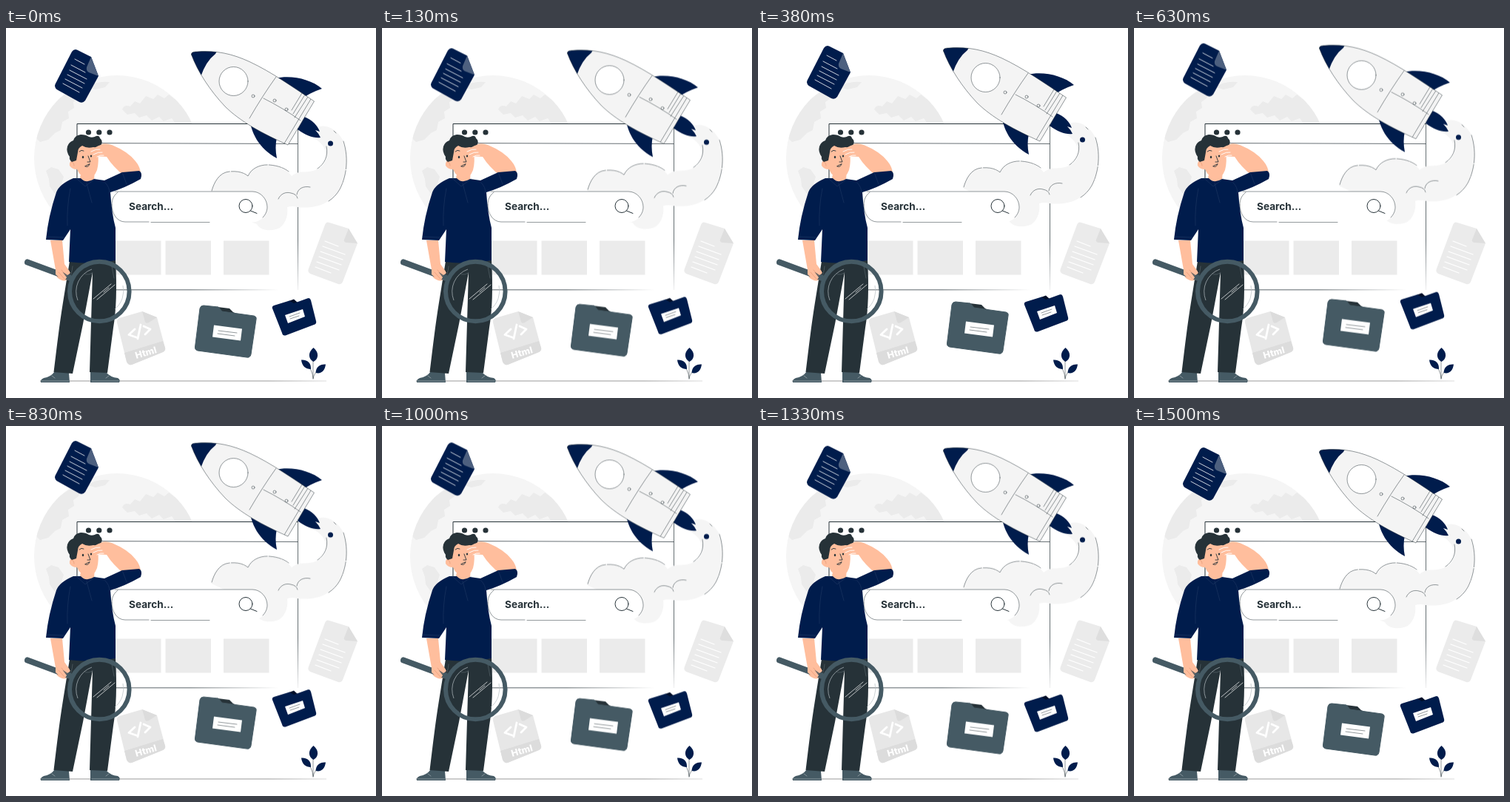
These frames come from a looping animation (500 by 500 pixels, 1540 ms). An HTML page:

```html
<!DOCTYPE html>
<html lang="en">
<head>
<meta charset="utf-8">
<title>Search</title>
<style>
  html, body { margin: 0; width: 100%; height: 100%; overflow: hidden; background: #fff; }
  svg { display: block; width: 100%; height: 100%; }
  .float { animation: float 1540ms steps(18, end) -5ms infinite; }
  /* 18 steps up, 18 steps down, one held step */
  @keyframes float {
    0% { transform: translateY(0); }
    48.6486% { transform: translateY(-10px); }
    97.2973%, 100% { transform: translateY(0); }
  }
  .navy { fill: #001c4c; }
  .dark { fill: #263238; }
  .slate { fill: #455a64; }
  .skin { fill: #ffbe9d; }
  .pale { fill: #ebebeb; }
  .white { fill: #fff; }
  .line { fill: none; stroke: #263238; stroke-width: .5; stroke-linecap: round; stroke-linejoin: round; }
  .rule { fill: none; stroke: #fff; stroke-width: .8; stroke-linecap: round; }
</style>
</head>
<body>
<svg viewBox="0 0 500 500">
  <defs>
    <linearGradient id="fadeX">
      <stop offset="0" stop-color="#263238"/><stop offset=".5" stop-color="#263238"/><stop offset="1" stop-color="#263238" stop-opacity="0"/>
    </linearGradient>
    <linearGradient id="fadeY" x2="0" y2="1">
      <stop offset="0" stop-color="#263238"/><stop offset=".7" stop-color="#263238"/><stop offset="1" stop-color="#263238" stop-opacity=".1"/>
    </linearGradient>
    <linearGradient id="ground" gradientUnits="userSpaceOnUse" x1="46" y1="0" x2="433" y2="0">
      <stop offset="0" stop-color="#999"/><stop offset=".8" stop-color="#999"/><stop offset="1" stop-color="#ddd"/>
    </linearGradient>
    <clipPath id="globe"><circle cx="150" cy="176" r="112"/></clipPath>
    <path id="hull" d="M250.500 36C250 33 253 32 258 32C285 30 306 35 329 45.500C360 60 389 81 416.500 99L381 158C347 143 316 126 296 106C276 85 259 59 250.500 36Z"/>
    <clipPath id="body"><use href="#hull"/></clipPath>
  </defs>

  <!-- planet -->
  <circle cx="150" cy="176" r="112" fill="#f5f5f5"/>
  <g class="pale" clip-path="url(#globe)">
    <path d="M157 110Q160 103 168 106L174 99L181 102L189 92L199 96L205 90L214 95L220 90L242 106L252 132H231L224 122L213 126L207 120L197 125L190 118L180 121L174 115L164 117Z"/>
    <path d="M50 122L60 106L73 94L90 83L101 86L98 95L91 100L92 108L84 113L85 122L76 127L74 138L66 142L57 151L46 154L40 148Z"/>
    <path d="M54 193L61 188L71 191L78 201L74 214L66 224L59 214L58 204Z"/>
    <path d="M110 80Q122 71 140 73L134 80L121 83Z"/>
  </g>

  <!-- browser window -->
  <path class="white" d="M96 129H394V354H96Z"/>
  <path class="line" d="M394 129.500H96V220" style="stroke-width:1"/>
  <path class="line" d="M96 155.500L394 156.500" style="stroke-width:.7"/>
  <path d="M394 129H394.700V354H394Z" fill="url(#fadeY)"/>
  <path d="M130 353.500H368V354.200H130Z" fill="url(#fadeX)"/>
  <g class="dark">
    <circle cx="111.500" cy="141" r="3.600"/><circle cx="125.800" cy="141" r="3.600"/><circle cx="140" cy="141" r="3.600"/>
  </g>
  <path class="pale" d="M140 287.500H209.500V333.500H140ZM215.500 287.500H277V333.500H215.500ZM294 287.500H355.500V333.500H294Z"/>

  <!-- smoke -->
  <g class="float">
    <path d="M278 222C279 212 286 196 302 194C312 193 321 195 327 200C332 189 344 184 356 185C371 186 380 192 386 200C395 193 401 195 410 194C426 192 435 182 432 169C431 158 421 151 412 147L424 133C436 130 449 140 455 151C465 174 461 199 451 218C440 237 418 245 394 242Q387 240 380 242C382 254 376 270 365 272C355 275 343 273 339 265C326 261 313 250 303 234Z" fill="#f5f5f5"/>
    <path class="line" d="M278 220C281 209 288 195 302 194C313 193 321 195 327 200C332 189 344 184 356 185C369 186 377 190 382 194M456 153C463 174 461 199 451 218C447 225 442 230 436 234" stroke-dasharray="38 2 17 1"/>
    <path class="line" d="M368 231C371 224 378 221 385 223C390 224 393 226 394 230M393 225C394 217 402 213 411 215M433 160C436 173 430 184 421 190"/>
    <circle class="navy" cx="438.500" cy="156" r="3.500"/>
    <path class="line" d="M443 139L446 142"/>
  </g>

  <!-- search bar -->
  <rect class="white" x="143" y="221" width="210" height="41.500" rx="20.700"/>
  <path class="line" d="M147 221H333C344 221 353 231 353 242C353 248 350 253 347 256"/>
  <path class="line" d="M143 239C143 251 150 262 161 262H193M196 262.500H275M143 239C143 231 146 226 151 222"/>
  <text x="166" y="246" class="dark" font-family="Montserrat, Inter, sans-serif" font-size="13.600" font-weight="700">Search...</text>
  <g class="line" style="stroke-width:1"><circle cx="324" cy="240.500" r="9"/><path d="M330.500 247L339 250.500"/></g>

  <!-- rocket -->
  <g class="float">
    <path class="navy" d="M364 68C385 63 412 69 427 82C416 86 406 90 398 98ZM329 119C330 141 342 163 366 176C364 166 364 157 366 148Z"/>
    <path class="navy" d="M403 120C414 124 421 132 424 140L418 138Q423 143 425 148C416 149 406 146 394 137Z"/>
    <use href="#hull" fill="#f4f4f4"/>
    <g clip-path="url(#body)">
      <path class="navy" d="M245 22H290L283 35Q270 45 263 66L245 66Z"/>
      <path class="line" d="M365 66Q347 91 329 122M348 95Q374 108 398 125M412 96L376 156M408 93L390 121M404 90L388 116M400 88L386 111"/>
    </g>
    <use href="#hull" class="line"/>
    <circle cx="307.500" cy="72" r="19.500" class="line" style="fill:#fff"/>
    <g class="line"><circle cx="334" cy="92" r="2"/><circle cx="363" cy="98" r="2"/><circle cx="379" cy="110" r="2"/></g>
  </g>

  <!-- pale document -->
  <path class="pale" d="M437 263L463 271L475 291L455 343Q453 347 449 346L411 332Q407 330 409 325L431 266Q433 261 437 263Z"/>
  <path d="M463 271L457 286Q456 289 460 290L475 291Z" fill="#dedede"/>
  <path class="rule" d="M431 288L449 295M428 295L458 306M425 302L455 313M423 309L453 320M420 316L450 327M418 323L439 331" style="stroke-width:1.100"/>

  <!-- html document -->
  <path d="M150 398Q149 394 153 392L184 383L204 391L215 432Q216 436 212 438L170 455Q165 456 163 451Z" fill="#e7e7e7"/>
  <path d="M160 439L212 423L215 432Q216 436 212 438L170 455Q165 456 163 451Z" fill="#dcdcdc"/>
  <path d="M184 383L188 397Q189 400 193 398L204 391Z" fill="#dcdcdc"/>
  <path d="M174 407L166 414.500L176 418M178 420L182 401M186 403L195 407L188 414" fill="none" stroke="#fff" stroke-width="2.800" stroke-linecap="round" stroke-linejoin="round"/>
  <text transform="translate(176 447) rotate(-16)" fill="#fff" font-family="Montserrat, Inter, sans-serif" font-size="12.500" font-weight="800">Html</text>

  <!-- navy document -->
  <g class="float">
    <path class="navy" d="M96 29.500L115 39L125 65L107 98Q104 102 99 100L68.500 83Q65 80 66.500 76L89 32Q92 28 96 29.500Z"/>
    <path d="M115 39L109 53Q108 58 112 60L125 65Z" fill="#4d607f"/>
    <path class="rule" d="M93 42L106 49M88 50L107 60M86 57L109 69M83 63L106 75M80 69L103 81M77 75L99 87"/>
  </g>

  <!-- folders -->
  <g class="float">
    <path class="dark" d="M286 377L302 379L307 384L320 390H286Z"/>
    <path class="slate" d="M267 375L287 377L292 383L335 389Q339 390 338 394L331 441Q330 446 325 445L259 436Q255 435 255.500 431L262 379Q263 375 267 375Z" stroke="#455a64"/>
    <path class="white" d="M281 401.500L319 406.500L317 422.500L279 417.500Z"/>
    <path class="line" d="M287 409L312 412M286 413L309 416"/>
  </g>
  <g class="float">
    <path d="M382 369L389 366.500L394 371L386 375Z" fill="#000e28"/>
    <path class="navy" d="M362 375L383 368.500L389 372L407 365.500Q411 364 412 368L419 396Q420 400 416 401L379 415Q374 417 373 412L360 379Q359 376 362 375Z"/>
    <path class="white" d="M377 388L401 380L404 390L381 399Z"/>
    <path class="line" d="M383 390L397 385M384 393L396 389"/>
  </g>

  <!-- ground and plant -->
  <path d="M46 477H433" stroke="url(#ground)" stroke-width="1"/>
  <path class="line" d="M415 474V441M415 473Q414 461 405 453M415 474Q416 465 426 460"/>
  <g class="navy">
    <path d="M415.500 432C408 438 408 447 415.500 451C423 447 423 438 415.500 432Z"/>
    <path d="M399 448.500C400 457 405 461 412 461C412.500 453 408 448 399 448.500ZM432 454.500C424 454 419 458 418.500 466C426 468 431 463 432 454.500Z"/>
  </g>

  <!-- man: legs -->
  <path class="slate" d="M66 464L85 466L86 479H47Q46 475 51 473Q60 472 66 464ZM114 464L135 465Q141 472 151 473Q155 475 153 479H114Z"/>
  <path class="line" d="M48 477H85M116 477H152M62 470L66 473M139 470L135 473" style="stroke:#fff;opacity:.7"/>
  <path class="dark" d="M86 315L148 314Q151 370 145 405L137 466L113 465L117 330L104 400L90 467L64.500 465C69 429 72 402 77 371Z"/>
  <path class="line" d="M117 331Q112 334 107 333M90 322Q89 333 85 340M143 322L146 338" style="stroke:#66747a"/>

  <!-- man: arm, torso -->
  <path class="skin" d="M103 190L120 191L119 206Q108 216 100 202Z"/>
  <path class="skin" d="M121 165Q124 160 129 157Q135 155 143 158Q165 167 175 180Q181 187 182 196L160 200Q144 187 136 174Z"/>
  <path class="navy" d="M91 203L101 203Q108 211 119 204L133 206L157 195L180 193Q185 196 182 204Q161 216 141 222Q143 252 148 270V314Q118 320 85 316L87 272L77 287L54 286Q57 255 68 222Q72 211 91 203Z"/>
  <path class="line" d="M87 217Q82 242 83 267M134 209Q140 215 140 223M157 195L163 211M55 282L78 283M109 210L116 236M95 203L107 214L120 204" style="stroke:#263f68"/>

  <!-- man: head -->
  <path class="skin" d="M92 166Q95 155 108 156Q120 156 124 163Q126 182 123 192Q119 203 110 203Q100 201 96 191Q89 191 86 186Q85 179 92 178Z"/>
  <path class="dark" d="M89 181Q85 178 86 174Q81 167 83 160Q85 154 91 152Q93 145 101 144Q108 144 112 147Q117 149 122 146Q126 145 127 149Q131 152 129 157Q126 162 118 161Q109 163 103 159Q97 162 97 168L95 179Z"/>
  <path class="skin" d="M115 166Q121 160 128 158L139 158L136 174L118 173L120 169Z"/>
  <path class="line" d="M115 167Q122 163 127 164M118 171Q125 167 130 168M123 174Q128 171 132 172" style="stroke:#fff;stroke-width:.9"/>
  <g class="dark"><ellipse cx="104" cy="174.500" rx="1.200" ry="1.800"/><ellipse cx="115" cy="173" rx="1.100" ry="1.600"/></g>
  <path class="line" d="M99 167Q102 164 105 166M111 173L114 181L110 181M107 187Q111 189 113 184Z" style="stroke-width:.9"/>
  <path class="line" d="M88 181Q92 181 92 186" style="stroke:#d98b66"/>

  <!-- man: left hand with magnifier -->
  <path class="skin" d="M60 287L76 287L79 319L86 329L84 340Q77 344 69 337L66 321Z"/>
  <path d="M29 316.500L87 338" stroke="#455a64" stroke-width="8" stroke-linecap="round"/>
  <circle cx="126.300" cy="356" r="40.300" fill="none" stroke="#455a64" stroke-width="6"/>
  <path d="M97 368A32 32 0 0 1 116 326M158 348A32 32 0 0 1 147 380" fill="none" stroke="#b5bec2" stroke-width=".7"/>
  <path class="rule" d="M118 366L142 346M123 367L147 347M132 357L139 351" style="stroke-width:.7"/>
  <path class="skin" d="M67 321L78 319Q83 324 87 331L83 334L76 329L82 337Q80 342 75 340L67 333Z"/>
  <path class="line" d="M75 327L82 335M71 330L79 339" style="stroke:#d98b66"/>
</svg>
</body>
</html>
```
